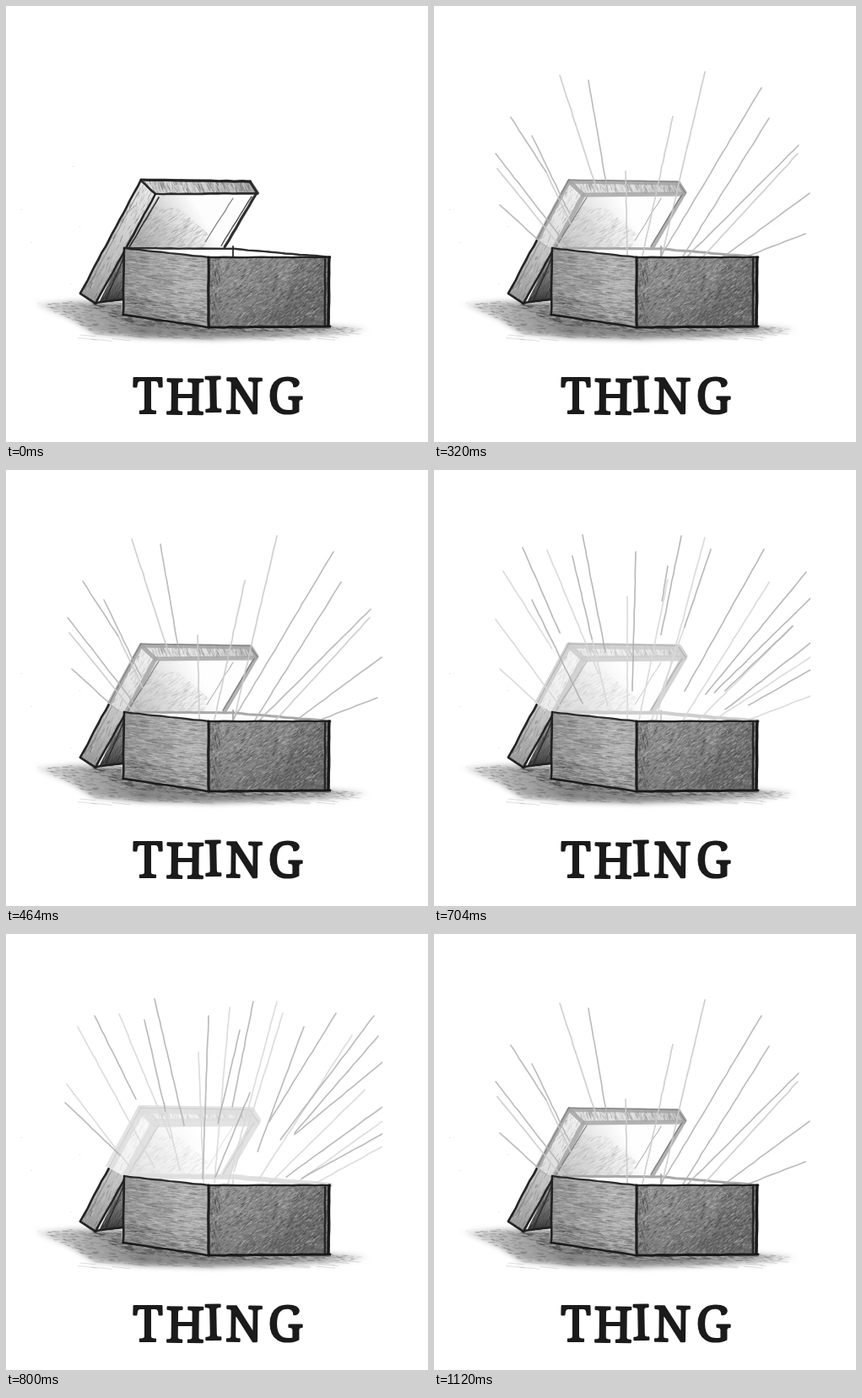
An HTML page with a canvas for the animation above (1.28 s loop, 500x517 px).

```html
<!DOCTYPE html>
<html lang="en">
<head>
<meta charset="utf-8">
<title>Thing</title>
<style>
  html, body { margin: 0; width: 100%; height: 100%; overflow: hidden; background: #fff; }
  canvas { display: block; }
</style>
</head>
<body>
<canvas id="stage" width="500" height="517" aria-label="A box opening with rays of light, titled THING"></canvas>
<script>
const W = 500, H = 517;
const view = document.getElementById('stage').getContext('2d');

let seed = 1;
function rnd() {
  seed = (seed + 0x6D2B79F5) | 0;
  let t = Math.imul(seed ^ (seed >>> 15), 1 | seed);
  t = (t + Math.imul(t ^ (t >>> 7), 61 | t)) ^ t;
  return ((t ^ (t >>> 14)) >>> 0) / 4294967296;
}
const between = (a, b) => a + (b - a) * rnd();
const grey = (v, a = 1) => `rgba(${v | 0},${v | 0},${v | 0},${a})`;

function trace(g, pts) {
  g.beginPath();
  pts.forEach(([x, y], i) => i ? g.lineTo(x, y) : g.moveTo(x, y));
}

function within(g, pts, paint) {
  g.save();
  trace(g, pts);
  g.closePath();
  g.clip();
  paint();
  g.restore();
}

function fill(g, pts, style) {
  trace(g, pts);
  g.closePath();
  g.fillStyle = style;
  g.fill();
}

// Linear tone from one point to another, stops are grey values.
function tone(g, x0, y0, x1, y1, stops) {
  const t = g.createLinearGradient(x0, y0, x1, y1);
  stops.forEach((v, i) => t.addColorStop(i / (stops.length - 1), grey(v)));
  return t;
}

// Scattered short pencil marks inside a shape.
function hatch(g, pts, n, angle, len, lo, hi, alpha) {
  const xs = pts.map(p => p[0]), ys = pts.map(p => p[1]);
  const x0 = Math.min(...xs), x1 = Math.max(...xs);
  const y0 = Math.min(...ys), y1 = Math.max(...ys);
  within(g, pts, () => {
    for (let i = 0; i < n; i++) {
      const x = between(x0, x1), y = between(y0, y1);
      const a = angle + between(-0.2, 0.2), l = len * between(0.4, 1.2) / 2;
      const dx = Math.cos(a) * l, dy = Math.sin(a) * l;
      g.strokeStyle = grey(between(lo, hi), alpha);
      g.lineWidth = between(0.5, 1.1);
      trace(g, [[x - dx, y - dy], [x + dx, y + dy]]);
      g.stroke();
    }
  });
}

// Slightly uneven pencil line through a few points.
function pencil(g, pts, width, v, alpha = 1) {
  g.lineCap = g.lineJoin = 'round';
  for (let pass = 0; pass < 2; pass++) {
    const path = [pts[0]];
    for (let i = 1; i < pts.length; i++) {
      const [ax, ay] = pts[i - 1], [bx, by] = pts[i];
      const steps = Math.max(1, Math.round(Math.hypot(bx - ax, by - ay) / 9));
      for (let s = 1; s <= steps; s++) {
        const k = s / steps;
        path.push([ax + (bx - ax) * k + between(-0.4, 0.4), ay + (by - ay) * k + between(-0.4, 0.4)]);
      }
    }
    g.strokeStyle = grey(v, alpha * (pass ? 0.7 : 0.9));
    g.lineWidth = width * (pass ? 0.65 : 1);
    trace(g, path);
    g.stroke();
  }
}

const lidSide = [[160, 206], [88, 341], [106, 353], [177, 224]];
const lidRim = [[160, 206], [289, 208], [298, 222], [177, 223]];
const lidInside = [[179, 225], [292, 224], [260, 286], [141, 287]];
const mouth = [[140, 287], [269, 288], [384, 298], [240, 298]];
const leftFace = [[140, 287], [240, 298], [240, 381], [139, 366]];
const rightFace = [[240, 298], [384, 298], [383, 380], [240, 381]];
const ground = [[34, 353], [80, 350], [140, 351], [140, 364], [240, 380], [384, 379],
  [430, 383], [404, 388], [340, 392], [245, 395], [160, 393], [104, 388], [76, 371]];
const lit = [[60, 60], [450, 60], [450, 300], [240, 298], [139, 287], [120, 276], [60, 276]];
const unlit = [[60, 276], [120, 276], [139, 287], [240, 298], [240, 400], [60, 400]];

function drawGround(g) {
  seed = 11;
  g.save();
  g.filter = 'blur(3px)';
  fill(g, ground, tone(g, 34, 0, 430, 0, [225, 170, 130, 135, 140, 165, 225]));
  g.restore();
  hatch(g, ground, 1300, 0.1, 8, 60, 190, 0.4);
  const shade = [[96, 354], [140, 354], [140, 366], [240, 381], [384, 381], [400, 384], [240, 388], [142, 377]];
  hatch(g, shade, 1100, 0.12, 9, 20, 110, 0.4);
  // loose strokes trailing off the shadow
  for (let i = 0; i < 45; i++) {
    const x = between(85, 400), y = between(386, 395), l = between(6, 24);
    pencil(g, [[x, y], [x + l, y + l * 0.1]], 0.7, 150, 0.35);
  }
  g.fillStyle = grey(215);
  for (const [x, y] of [[79, 190], [18, 241], [30, 280], [76, 329], [87, 261]]) g.fillRect(x, y, 1, 1);
}

function lidTone(g) {
  seed = 23;
  fill(g, lidSide, tone(g, 165, 215, 95, 345, [232, 212, 186, 155]));
  hatch(g, lidSide, 900, 2.05, 7, 70, 235, 0.4);
  fill(g, lidRim, tone(g, 165, 0, 298, 0, [215, 222, 200, 165]));
  hatch(g, lidRim, 480, 1.2, 9, 60, 230, 0.4);
  fill(g, lidInside, tone(g, 150, 278, 225, 235, [165, 190, 225, 253]));
  hatch(g, [[172, 238], [205, 240], [240, 270], [234, 287], [143, 287]], 650, -0.55, 9, 105, 245, 0.33);
}

// The lid in full pencil.
function darkLid(g) {
  lidTone(g);
  seed = 31;
  const gap = [[141, 288], [150, 288], [140, 349], [110, 352]];
  fill(g, gap, tone(g, 140, 290, 125, 350, [190, 120, 55]));
  hatch(g, gap, 250, 2, 8, 20, 150, 0.5);
  pencil(g, [[160, 206], [289, 208]], 3.2, 28);
  pencil(g, [[160, 206], [88, 341], [106, 353]], 2.6, 30);
  pencil(g, [[289, 208], [298, 222]], 3.4, 40);
  pencil(g, [[160, 207], [177, 223], [297, 222]], 2.6, 35);
  pencil(g, [[177, 223], [106, 353]], 2.6, 30);
  pencil(g, [[181, 227], [141, 295], [118, 349]], 1.6, 45);
  pencil(g, [[106, 352], [139, 348]], 2.4, 30);
  pencil(g, [[297, 222], [259, 286]], 3.2, 40);
  pencil(g, [[291, 226], [255, 284]], 1.4, 80);
  pencil(g, [[269, 228], [236, 280]], 1.1, 120);
  pencil(g, [[155, 224], [97, 334]], 0.9, 115, 0.7);
}

// The lid washed out by the light.
function paleLid(g, { width, line, keep, core }) {
  g.save();
  g.globalAlpha = keep;
  lidTone(g);
  g.restore();
  seed = 37;
  g.save();
  g.lineJoin = 'round';
  g.lineWidth = width;
  g.strokeStyle = grey(line, 0.85);
  for (const pts of [
    [[106, 307], [160, 208], [290, 210], [297, 221], [259, 286]],
    [[130, 310], [177, 224], [296, 223]],
    [[160, 208], [177, 224]]
  ]) {
    trace(g, pts);
    g.stroke();
  }
  g.restore();
  pencil(g, [[160, 206], [289, 208], [298, 222]], 1.2, core, 0.6);
  pencil(g, [[106, 307], [160, 206]], 1.2, core, 0.6);
  pencil(g, [[294, 224], [257, 285]], 1.3, core, 0.7);
  pencil(g, [[181, 227], [141, 291]], 1.2, core, 0.7);
  pencil(g, [[269, 228], [238, 278]], 1, core, 0.5);
}

function drawBox(g) {
  seed = 47;
  fill(g, leftFace, tone(g, 140, 340, 240, 325, [140, 155, 168, 185, 178]));
  hatch(g, leftFace, 1900, 0.1, 9, 60, 235, 0.36);
  hatch(g, [[140, 342], [240, 358], [240, 380], [140, 366]], 260, 0.14, 12, 40, 140, 0.35);
  fill(g, rightFace, tone(g, 250, 300, 300, 381, [152, 142, 128, 105]));
  hatch(g, rightFace, 4200, -0.6, 4, 25, 230, 0.38);
  hatch(g, [[345, 299], [384, 298], [384, 380], [325, 380]], 500, -0.8, 5, 30, 120, 0.35);
  hatch(g, [[241, 300], [256, 300], [254, 380], [241, 380]], 200, 1.4, 6, 30, 130, 0.35);
  pencil(g, [[140, 287], [240, 298]], 2.2, 35);
  pencil(g, [[240, 298], [384, 298]], 2.4, 28);
  pencil(g, [[140, 287], [139, 366]], 2.6, 30);
  pencil(g, [[139, 366], [240, 381]], 2.6, 25);
  pencil(g, [[240, 381], [384, 380]], 3, 22);
  pencil(g, [[240, 298], [240, 381]], 3.2, 25);
  pencil(g, [[383, 298], [382, 379]], 3.4, 22);
  pencil(g, [[378, 300], [378, 378]], 2.4, 35);
}

function drawMouth(g, v, width) {
  seed = 41;
  fill(g, mouth, '#fdfdfd');
  pencil(g, [[140, 287], [269, 288], [384, 298]], width, v);
  pencil(g, [[269, 285], [269, 298]], 1.8, v);
}

function drawRays(g, { dark, pale }, tones) {
  seed = 59;
  const cast = (list, v, w) => {
    for (const [x0, y0, x1, y1] of list) pencil(g, [[x0, y0], [x1, y1]], w, v, 0.85);
  };
  g.save();
  g.beginPath();
  g.rect(69, 76, 377, 224);
  g.clip();
  cast(pale, tones[1], 1.7);
  cast(dark, tones[0], 1.6);
  g.restore();
}

function drawTitle(g) {
  g.font = '58px "Noto Serif", "Liberation Serif", serif';
  g.textAlign = 'center';
  g.textBaseline = 'alphabetic';
  g.lineJoin = 'round';
  g.lineWidth = 2.2;
  g.fillStyle = g.strokeStyle = '#1b1b1b';
  const marks = [['T', 168, 483, 0], ['H', 212, 484, 0.01], ['I', 246, 481, -0.02],
    ['N', 282, 483, 0.01], ['G', 331, 483, 0]];
  for (const [ch, x, y, turn] of marks) {
    g.save();
    g.translate(x, y);
    g.rotate(turn);
    g.fillText(ch, 0, 0);
    g.strokeText(ch, 0, 0);
    g.restore();
  }
}

const opening = {
  dark: [[91, 132, 133, 197], [116, 154, 160, 245], [73, 175, 160, 287], [183, 88, 206, 222],
    [388, 97, 268, 298], [397, 133, 294, 298], [432, 165, 300, 297], [445, 222, 342, 298],
    [440, 270, 368, 298], [78, 236, 132, 285]],
  pale: [[149, 82, 192, 215], [133, 197, 164, 262], [75, 193, 152, 288], [227, 196, 229, 296],
    [283, 131, 247, 296], [321, 78, 270, 297], [431, 175, 318, 298]]
};
const shining = {
  dark: [[176, 77, 203, 216], [164, 102, 187, 200], [105, 92, 149, 193], [116, 154, 176, 277],
    [239, 97, 235, 262], [293, 78, 269, 195], [277, 114, 270, 155], [391, 94, 297, 262],
    [441, 121, 322, 266], [446, 152, 332, 264], [425, 185, 345, 262], [446, 205, 345, 284],
    [446, 237, 373, 279], [328, 94, 297, 186]],
  pale: [[82, 120, 140, 212], [73, 177, 150, 281], [78, 236, 132, 285], [134, 95, 195, 242],
    [277, 130, 243, 296], [321, 80, 263, 296], [397, 133, 294, 298], [425, 185, 312, 298],
    [446, 222, 330, 298], [446, 268, 368, 298], [187, 200, 206, 280], [229, 150, 229, 296],
    [297, 186, 258, 296]]
};
const blazing = {
  dark: [[176, 77, 211, 227], [164, 102, 189, 210], [105, 97, 154, 196], [70, 200, 135, 262],
    [240, 97, 233, 290], [277, 114, 251, 225], [289, 188, 248, 288], [353, 110, 298, 258],
    [391, 94, 312, 222], [436, 97, 325, 244], [441, 121, 342, 236], [446, 152, 342, 238],
    [446, 205, 332, 288], [446, 237, 350, 290], [293, 80, 268, 205]],
  pale: [[85, 110, 176, 277], [72, 178, 150, 281], [134, 95, 195, 242], [228, 140, 234, 296],
    [265, 87, 247, 294], [328, 94, 270, 282], [321, 80, 263, 296], [410, 120, 300, 290],
    [425, 185, 310, 298], [446, 222, 340, 298], [446, 252, 362, 298], [187, 200, 206, 280]]
};

const looks = [
  null,
  { rays: opening, tones: [180, 203], width: 5, line: 165, keep: 0.62, core: 105 },
  { rays: shining, tones: [176, 216], width: 7, line: 205, keep: 0.36, core: 165 },
  { rays: blazing, tones: [178, 218], width: 10, line: 222, keep: 0.26, core: 200 }
];

function compose(look) {
  const c = document.createElement('canvas');
  c.width = W;
  c.height = H;
  const g = c.getContext('2d');
  g.fillStyle = '#fff';
  g.fillRect(0, 0, W, H);
  drawGround(g);
  if (look) {
    within(g, unlit, () => darkLid(g));
    within(g, lit, () => paleLid(g, look));
    drawMouth(g, look.line, look.width * 0.6);
    drawRays(g, look.rays, look.tones);
  } else {
    darkLid(g);
    drawMouth(g, 40, 2.4);
  }
  drawBox(g);
  drawTitle(g);
  return c;
}

const pictures = looks.map(compose);
const cues = [[0, 0], [320, 1], [560, 2], [800, 3], [960, 2], [1120, 1]];
const start = performance.now();

function tick() {
  const t = (performance.now() - start) % 1280;
  let now = 0;
  for (const [at, i] of cues) if (t >= at) now = i;
  view.drawImage(pictures[now], 0, 0);
  requestAnimationFrame(tick);
}
tick();
</script>
</body>
</html>
```
